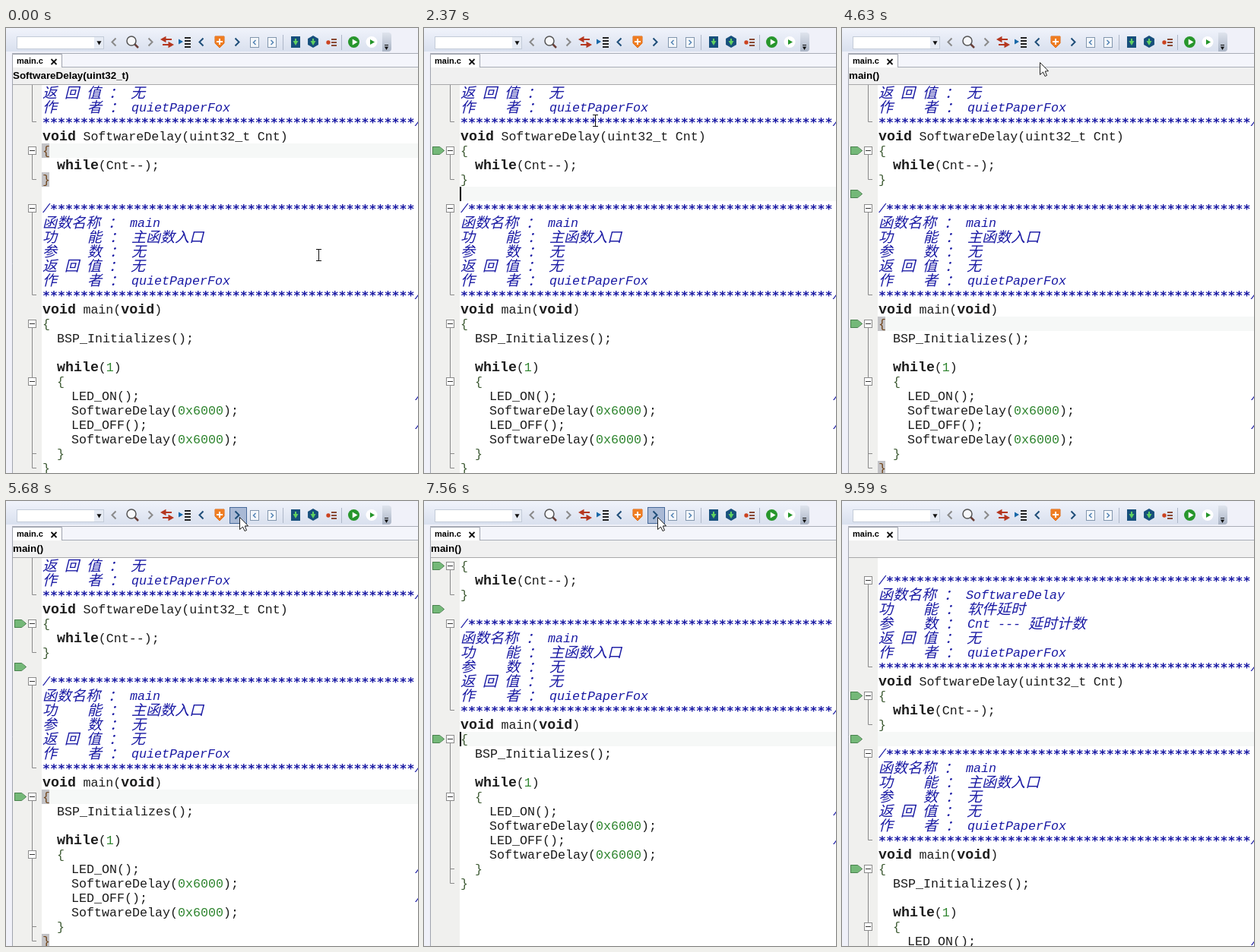
These frames come from a looping animation (542x586 px, 9950 ms). An HTML page with a canvas:

```html
<!DOCTYPE html>
<html lang="zh-CN">
<head>
<meta charset="utf-8">
<title>Editor bookmarks</title>
<style>
html, body { margin: 0; width: 100%; height: 100%; overflow: hidden; background: #fff; }
canvas { display: block; width: 542px; height: 586px; }
</style>
</head>
<body>
<canvas id="stage" width="542" height="586"></canvas>
<script>
const ctx = document.getElementById('stage').getContext('2d');
const W = 542, H = 586, LOOP = 9950, PITCH = 19, LEFT = 48, TOP = 75, MIDDLE = 12;
const BLUE = '#1a1aa4', CODE = '#1c1c1c', STEEL = '#1f4e79', GREY = '#8a8a8a';
const FONTS = {
  latin: '16.66px "Liberation Mono", monospace',
  bold: 'bold 18.3px "Liberation Mono", monospace',
  star: 'bold 16.6px "DejaVu Sans Mono", monospace',
  han: '300 19px "Noto Sans CJK SC", "Noto Sans CJK", sans-serif'
};

// ---- document; line 0 is the first one shown at the start
const OPEN = '/' + '*'.repeat(48), CLOSE = '*'.repeat(49) + '/';
const header = (name, use, arg) => [
  OPEN, `函数名称 ： ${name}`, `功    能 ： ${use}`, `参    数 ： ${arg}`,
  '返 回 值 ： 无', '作    者 ： quietPaperFox', CLOSE
];
const lines = [
  '/* 包含的头文件 ' + '-'.repeat(36), '#include "bsp.h"', '', '',
  ...header('SoftwareDelay', '软件延时', 'Cnt --- 延时计数'),
  'void SoftwareDelay(uint32_t Cnt)', '{', '  while(Cnt--);', '}', '',
  ...header('main', '主函数入口', '无'),
  'void main(void)', '{', '  BSP_Initializes();', '', '  while(1)', '  {',
  '    LED_ON();', '    SoftwareDelay(0x6000);', '    LED_OFF();',
  '    SoftwareDelay(0x6000);', '  }', '}'
].map((text, n) => ({ text, row: n - 8 }));

const folds = [], opened = [];
for (const { text, row } of lines) {
  if (text === OPEN || text.trim() === '{') opened.push(row);
  if (text === CLOSE || text.trim() === '}') folds.push([opened.pop(), row]);
}
const DELAY = 4, GAP = 7, MAIN = 16;
const titles = { [DELAY]: 'SoftwareDelay(uint32_t)', [MAIN]: 'main()' };

// ---- story: the pointer visits spots and clicks there
const REACH = 140, LEAVE = 60, LAG = 110, BLINK = 530;
const spot = n => ({ x: 257 + 25 * n, y: 21 });
const onRow = (row, x) => ({ x, y: 87 + PITCH * row, row });
const prev = { ...spot(0), step: -1 }, mark = { ...spot(1), mark: true }, next = { ...spot(2), step: 1 };
const visit = (t, at) => ({ t, ...at });
const visits = [
  visit(0, { x: 411, y: 299 }), visit(1030, mark), visit(2090, onRow(GAP, 170)), visit(2740, mark),
  visit(3690, onRow(MAIN, 80)), visit(4330, mark), visit(4770, { x: 260, y: 45 }),
  ...[5700, 6490, 7080, 7650].map(t => visit(t, next)),
  ...[8520, 9050].map(t => visit(t, prev)), visit(9700, { x: 560, y: 330 })
];

function stateAt(t) {
  const s = { row: DELAY, scroll: 0, marks: [], matched: true, since: Infinity };
  for (const v of visits.filter(v => v.t <= t)) {
    if (v.mark) {
      s.marks.push(s.row);
      s.since = Math.min(s.since, v.t);
    } else if (v.row) {
      Object.assign(s, { row: v.row, matched: v.row !== GAP, since: v.t });
    } else if (v.step) {
      const n = s.marks.length, i = (s.marks.indexOf(s.row) + v.step + n) % n;
      s.row = s.marks[i];
      Object.assign(s, { scroll: MIDDLE - s.row, matched: false, since: v.t });
    }
  }
  return s;
}

function pointerAt(t) {
  const i = visits.findIndex(v => v.t - REACH > t);
  if (i < 0) return t < visits[visits.length - 1].t - REACH ? visits[visits.length - 1] : null;
  const a = visits[Math.max(i - 1, 0)], b = visits[i];
  const u = Math.max(0, (t - a.t - LEAVE) / (b.t - REACH - a.t - LEAVE));
  return {
    x: Math.round(a.x + (b.x - a.x) * u * u * (3 - 2 * u)),
    y: Math.round(a.y + (b.y - a.y) * u)
  };
}

// ---- drawing helpers
function rect(x, y, w, h, fill) {
  ctx.fillStyle = fill;
  ctx.fillRect(x, y, w, h);
}
function frame(x, y, w, h, color) {
  ctx.strokeStyle = color;
  ctx.lineWidth = 1;
  ctx.strokeRect(x + .5, y + .5, w - 1, h - 1);
}
function trace(points) {
  ctx.beginPath();
  points.forEach(([x, y]) => ctx.lineTo(x, y));
}
function stroke(points, color, width = 1) {
  trace(points);
  ctx.strokeStyle = color;
  ctx.lineWidth = width;
  ctx.stroke();
}
function shape(points, fill, edge) {
  if (edge) stroke([...points, points[0]], edge);
  trace(points);
  ctx.fillStyle = fill;
  ctx.fill();
}
function disc(x, y, r, fill, edge) {
  ctx.beginPath();
  ctx.arc(x, y, r, 0, 7);
  ctx.fillStyle = fill;
  ctx.fill();
  if (!edge) return;
  ctx.strokeStyle = edge;
  ctx.lineWidth = 1.5;
  ctx.stroke();
}
function triangle(x, y, r, fill, turn = 0) {
  const corner = k => [x + r * Math.cos(turn + k * 2.094), y + r * Math.sin(turn + k * 2.094)];
  shape([0, 1, 2].map(corner), fill);
}
function shade(y0, y1, from, to) {
  const g = ctx.createLinearGradient(0, y0, 0, y1);
  g.addColorStop(0, from);
  g.addColorStop(1, to);
  return g;
}
function label(text, x, y, size) {
  ctx.font = `bold ${size}px "Liberation Sans", sans-serif`;
  ctx.fillStyle = '#000';
  ctx.fillText(text, x, y);
}

// ---- editor
function write(part, kind, x, y, color, style = '') {
  ctx.font = `${style} ${FONTS[kind]}`;
  ctx.fillStyle = color;
  ctx.fillText(part, x, y + (kind === 'star' || kind === 'han' ? 7 : 6));
  return x + ctx.measureText(part).width;
}

function comment(text, x, y) {
  for (const part of text.match(/[\u3000-\uffff]+|\*+|[^*\u3000-\uffff]+/g)) {
    const kind = part[0] >= '\u3000' ? 'han' : part[0] === '*' ? 'star' : 'latin';
    x = write(part, kind, x, y, BLUE, 'italic');
  }
}

function code(text, x, y, matched) {
  for (const part of text.match(/ +|#include|\b(?:void|while)\b|\w+|[{}]|[^\w{}# ]+/g) || []) {
    if (part[0] === ' ') {
      x += part.length * PITCH / 2;
      continue;
    }
    const color = /^\d/.test(part) ? '#2f852f' : part === '#include' ? BLUE
      : /[{}]/.test(part) ? (matched ? '#70451c' : '#3d5a33') : CODE;
    x = write(part, /^(void|while)$/.test(part) ? 'bold' : 'latin', x, y, color);
  }
  if (text.includes('LED_O')) comment('/', LEFT + 490, y);
}

function editor(t) {
  const s = stateAt(t), yOf = row => 85 + PITCH * (row + s.scroll);
  const pair = s.matched ? folds.find(f => f[0] === s.row) : [];
  ctx.save();
  ctx.beginPath();
  ctx.rect(9, TOP, W, H);
  ctx.clip();
  rect(9, TOP, 38, H, '#f0f0ee');
  rect(47, TOP, W, H, '#fff');
  rect(47, yOf(s.row) - 9, W, PITCH, '#f6f8f7');
  pair.forEach(row => rect(47, yOf(row) - 9, 10, PITCH, '#c3c3c6'));
  for (const [a, b] of folds)
    stroke([[34.5, yOf(a)], [34.5, yOf(b) + .5], [40, yOf(b) + .5]], GREY);
  for (const [a] of folds) {
    rect(29, yOf(a) - 5, 11, 11, '#fff');
    frame(29, yOf(a) - 5, 11, 11, GREY);
    rect(31, yOf(a), 7, 1, '#333');
  }
  for (const { text, row } of lines) {
    if (/^(\/|\*|[\u3000-\uffff])/.test(text)) comment(text, LEFT, yOf(row));
    else code(text, LEFT, yOf(row), pair.includes(row));
  }
  for (const row of s.marks) {
    const y = yOf(row) + .5;
    shape([[11.5, y - 5], [20.5, y - 5], [26.5, y], [20.5, y + 5], [11.5, y + 5]], '#74b878', '#1d4c23');
  }
  if (t >= s.since && (t - s.since) % (2 * BLINK) < BLINK)
    rect(s.matched ? 56 : 47, yOf(s.row) - 9, 2, PITCH, '#000');
  ctx.restore();
}

// ---- toolbar and tabs
function chevron(x, dir, color) {
  stroke([[x - dir * 2.5, 13.5], [x + dir * 2.5, 18.5], [x - dir * 2.5, 23.5]], color, 2);
}
function swap(y, dir) {
  const x = 212;
  stroke([[x - 6, y], [x + 6, y]], '#b5371f', 2);
  triangle(x + dir * 4, y, 5, '#b5371f', dir < 0 ? Math.PI : 0);
}
function page(x, dir) {
  rect(x - 6, 12, 12, 14, '#f4f7fb');
  frame(x - 6, 12, 12, 14, '#8296ad');
  stroke([[x - dir * 1.5, 16], [x + dir * 1.5, 19], [x - dir * 1.5, 22]], '#5383b4', 1.5);
}
function download(x) {
  rect(x - 1, 14, 2, 5, '#60d060');
  triangle(x, 19, 4, '#60d060', Math.PI / 2);
}
function hexagon(x, y, r, fill) {
  shape([...Array(6).keys()].map(k => [x + r * Math.sin(k * Math.PI / 3), y + r * Math.cos(k * Math.PI / 3)]), fill);
}

function icons() {
  rect(15, 11, 114, 17, '#fff');
  frame(14, 11, 115, 17, '#c3cbd8');
  rect(116, 12, 12, 15, '#e6ebf4');
  triangle(122.5, 19, 3.5, '#111', Math.PI / 2);
  chevron(142, -1, GREY);
  stroke([[169, 21], [174, 26]], '#6b4038', 2.5);
  disc(165, 17, 6, '#f7f8fb', '#555');
  chevron(190, 1, GREY);
  swap(15, -1);
  swap(22, 1);
  triangle(229, 18, 4, '#1768a8');
  for (let i = 0; i < 4; i++) rect(235, 12 + i * 4, 8, 2, '#222');
  chevron(257, -1, STEEL);
  shape([[275, 11], [287, 11], [287, 20], [281, 26], [275, 20]], '#ef7d22', '#d5610c');
  rect(280, 14, 2, 8, '#fff');
  rect(277, 17, 8, 2, '#fff');
  chevron(304, 1, STEEL);
  page(327, -1);
  page(350, 1);
  rect(375, 11, 12, 15, '#174f7c');
  download(381);
  hexagon(404, 18, 8, '#174f7c');
  download(404);
  disc(424, 19, 2.7, '#cc4320');
  for (let i = 0; i < 3; i++) rect(428, 14 + i * 4, 7, 2, '#8a4a36');
  for (const x of [364, 441]) rect(x, 9, 1, 20, '#aeb7c8');
  disc(457.5, 18.5, 7.5, '#27962c');
  triangle(458, 18.5, 4.5, '#fff');
  disc(481, 18.5, 7.5, '#fff');
  triangle(481, 18.5, 4, '#249529');
  rect(498, 22, 5, 1, '#111');
  triangle(500.5, 26, 3, '#111', Math.PI / 2);
}

function buttonGlow(t, at) {
  const hot = [prev, mark, next].find(b => at && at.y < 31 && Math.abs(at.x - b.x) < 11);
  if (!hot) return;
  const down = visits.some(v => (v.step || v.mark) && t >= v.t - REACH && t < v.t + LEAVE);
  const x = Math.round(hot.x * .94 + 5.5);
  rect(x, 8, 23, 22, down ? '#a9b9d5' : '#cedbf1');
  frame(x, 8, 23, 22, down ? '#486a9b' : '#8ca8d3');
}

function chrome(t, at) {
  rect(0, 0, W, H, '#f0f1f9');
  rect(0, 0, 504, 31, shade(0, 31, '#f0f3fb', '#d9e0ee'));
  ctx.beginPath();
  ctx.roundRect(495, 6, 12, 25, [0, 4, 4, 0]);
  ctx.fillStyle = shade(6, 31, '#dfe4ed', '#aab4c5');
  ctx.fill();
  buttonGlow(t, at);
  icons();
  rect(8, 33, W, 1, '#a9adb7');
  rect(9, 34, W, 17, '#f4f5fb');
  rect(9, 35, 64, 17, '#fff');
  stroke([[8.5, H], [8.5, 34.5], [73.5, 34.5], [73.5, 52]], '#a0a4ae');
  rect(74, 51, W, 1, '#a9adb7');
  label('main.c', 14, 47, 11);
  for (const d of [-3.5, 3.5]) stroke([[63 - d, 41], [63 + d, 48]], '#111', 1.8);
  rect(9, 52, W, 22, '#f0f0f0');
  rect(9, 74, W, 1, '#a8a8aa');
  label(titles[stateAt(t - LAG).row] || '', 9, 67, 13.4);
}

function drawPointer({ x, y }) {
  if (y >= TOP && x >= 47) {
    for (const d of [-7.5, 7.5]) stroke([[x - 3, y + d], [x + 4, y + d]], '#111');
    stroke([[x + .5, y - 7], [x + .5, y + 7]], '#111');
    return;
  }
  const arrow = [[0, 0], [0, 16], [4, 12.5], [6.5, 18], [9, 17], [6.7, 11.5], [11, 11.2]];
  const points = arrow.map(([a, b]) => [x + a + .5, y + b + .5]);
  shape(points, '#fff');
  stroke([...points, points[0]], '#222');
}

function render(t) {
  const at = pointerAt(t);
  chrome(t, at);
  editor(t);
  if (at) drawPointer(at);
}

const begun = performance.now();
function tick() {
  render((performance.now() - begun) % LOOP);
  requestAnimationFrame(tick);
}
tick();
</script>
</body>
</html>
```
